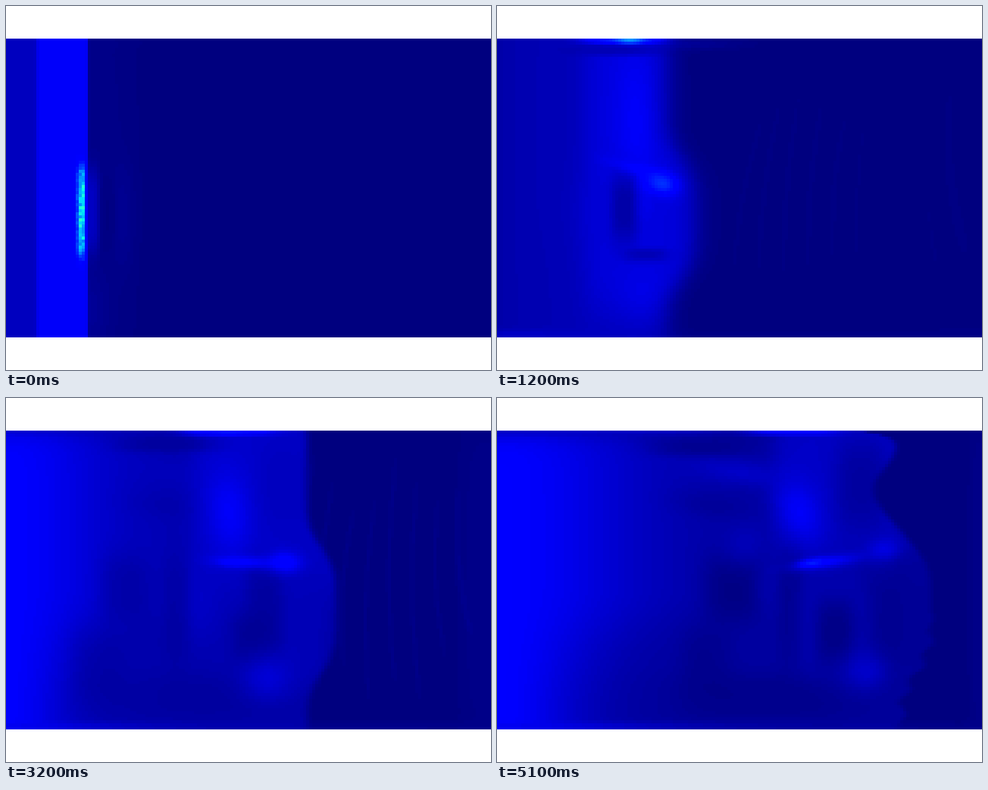
These frames come from a looping animation (640 px wide and 480 px high, 5200 ms). A matplotlib script:

```python
import numpy as np
import matplotlib.pyplot as plt
from matplotlib.animation import FuncAnimation

W, H, DPI = 640, 480, 100
TOP, BOTTOM = 43, 437
NX, NY = 160, 98
FRAMES, STEP = 52, 100

x = (np.arange(NX) + 0.5) * W / NX
y = TOP + (np.arange(NY) + 0.5) * (BOTTOM - TOP) / NY
X, Y = np.meshgrid(x, y)
rng = np.random.default_rng(4)
grain = rng.uniform(-1, 1, X.shape)

# Field levels: 0 is navy, 1 is pure blue, about 3.4 is cyan.


def ramp(v, a, b):
    s = np.clip((v - a) / (b - a), 0, 1)
    return s * s * (3 - 2 * s)


def sigmoid(d):
    return 1 / (1 + np.exp(-np.clip(d, -50, 50)))


def soft(cx, cy, rx, ry, p=2, turn=0):
    """Soft-edged patch; a higher p makes it boxier."""
    c, s = np.cos(np.radians(turn)), np.sin(np.radians(turn))
    dx, dy = X - cx, Y - cy
    u = np.abs(dx * c + dy * s) / rx
    v = np.abs(dy * c - dx * s) / ry
    return np.exp(-u ** p - v ** p)


class Layer:
    def __init__(self, field):
        self.field = field

    def mix(self, level, mask):
        self.field = self.field + (level - self.field) * mask

    def add(self, level, alpha, *shape, **kw):
        if alpha > 0.005:
            self.mix(level, alpha * soft(*shape, **kw))


def make_threads(count=10):
    """Faint curved threads that hang in the still region."""
    total = np.zeros_like(X)
    for i, x0 in enumerate(np.linspace(330, 605, count)):
        slant = -38 + 6 * i
        ya, yb = rng.uniform(80, 150), rng.uniform(300, 400)
        s = (Y - ya) / (yb - ya)
        line = x0 + slant * (s - 0.5) - 8 * np.sin(np.pi * s)
        window = sigmoid((Y - ya) / 5) * sigmoid((yb - Y) / 5)
        total = np.maximum(total, window * np.exp(-((X - line) / 4) ** 2))
    return total


threads = make_threads()


def front(t):
    """Mask of the flow: a slowing edge with a bulge, a notch and ripples."""
    late = ramp(t, 3, 4.6)
    edge = 108 + 102 * t - 3.6 * t * t
    edge = edge + 38 * ramp(t, 0, 1.4) * np.exp(-((y - 280) / 90) ** 4)
    edge -= 38 * late * np.exp(-((y - 122) / 42) ** 2)
    edge -= 60 * late * np.exp(-(y - TOP) / 7)
    edge += 5 * late * np.sin(y / 5) * ramp(y, 250, 350)
    width = 0.6 + 9 * ramp(t, 0, 0.6) - 7 * ramp(t, 1, 3.5)
    return sigmoid((edge[:, None] - X) / width)


def inlet(t):
    """Light that spreads from the left wall as the loop goes on."""
    floor = 0.54 - 0.055 * t
    reach = 45 + 28 * t
    squeeze = 1 + 2 * ramp(Y, 250, 420)
    light = 0.78 * ramp(t, 0.8, 4) * np.exp(-(X / reach) ** 2 * squeeze)
    dip = 0.32 * np.exp(-((t - 0.8) / 0.5) ** 2 - X / 60)
    rim = 0.6 * ramp(t, 1, 4.5) * np.exp(-(Y - TOP) / 10)
    return (floor + light - dip) * (1 - rim)


def column(layer, t):
    late = ramp(t, 2.4, 4.5)
    left = 41 + 64 * t
    foot = 200 + 500 * np.exp(-t / 1.3)
    width = 0.8 + 8 * ramp(t, 0, 0.6)
    band = sigmoid((X - left) / width) * sigmoid((foot - Y) / 20)
    layer.mix(0.57 + 0.43 * np.exp(-t / 1.6), 0.95 * band)
    layer.add(1.02, 0.9 * ramp(t, 0, 0.6), 118 + 55 * t, 150, 28,
              40 + 120 * np.exp(-t / 1.5), turn=-18 * late)
    # Wing on the left and shades around it
    layer.add(0.65, 0.8 * late, 65 + 50 * t, 98, 65, 17, turn=8)
    layer.add(0.15, 0.6 * late, 70 + 42 * t, 142, 48, 16, turn=8)
    layer.add(0.22, 0.85 * late, 175 + 60 * t, 115, 36, 65, p=3)
    layer.add(0.4 - 0.06 * t, 0.75 * ramp(t, 0.4, 1), 120 + 29 * t,
              56 + 1.7 * t, 65, 7 + t, p=3)


def left_side(layer, t):
    late = ramp(t, 2.4, 4.2)
    early = ramp(t, 0.2, 1) * (1 - ramp(t, 3, 4))
    layer.add(0.68, 0.65 * early, 60 + 61 * t, 272, 30, 52)
    # Dark folds
    layer.add(0.08, 0.85 * late, 130 + 45 * t, 395, 125, 33, p=3)
    layer.add(0.08, 0.75 * late, -145 + 83 * t, 355, 36, 55, p=3)
    layer.add(0.03, 0.9 * late, -110 + 83 * t, 250, 20 + 4 * t, 48, p=3)
    # Light between the folds
    layer.add(0.5, 0.8 * late, -45 + 73 * t, 192, 30, 28, turn=-35)
    layer.add(0.4, 0.7 * late, -15 + 73 * t, 248, 17, 45)
    layer.add(0.28, 0.6 * late, -70 + 80 * t, 322, 42, 22, turn=-30)
    layer.add(0.1, 0.85 * late, -50 + 86 * t, 282, 17, 75, p=3)


def right_side(layer, t):
    late = ramp(t, 2.4, 4.2)
    born = ramp(t, 0.1, 0.8)
    # Body just behind the front and its dark wake
    layer.add(0.93 - 0.145 * t, 0.8 * born, 130 + 82 * t, 285, 28,
              55 + 11 * t, p=4)
    layer.add(0.08 + 0.4 * np.exp(-t / 1.5), 0.87 * born, 65 + 86 * t,
              255 + 10 * t, 15 + 3 * t, 38 + 9 * t, p=3)
    # Arch, its hollow and the bright patch at the foot
    hollow = 120 + 64 * t
    layer.add(0.55, 0.75 * late, hollow, 300, 50, 66, p=3)
    layer.add(0.42 - 0.08 * t, 0.87 * born, hollow, 335 - 5 * t, 29,
              9 + 40 * ramp(t, 2.2, 3.8), p=3)
    layer.add(0.92 - 0.05 * t, 0.85 * born, 105 + 75 * t, 383 - 4.5 * t,
              40 - 2 * t, 40 - 2.8 * t)
    # Streak across the flow, bright at its tail late and its head early
    tilt = 22 - 6 * t
    layer.add(1.1, 0.85 * born, 115 + 63 * t, 216, 42, 8, turn=tilt)
    layer.add(1.45, 0.9 * late, 95 + 63 * t, 217, 18, 5, turn=tilt)
    layer.add(1.95 - 0.22 * t, 0.9 * born, 128 + 75 * t, 245 - 9 * t,
              22, 14, turn=tilt)


def walls(layer, t):
    born, late = ramp(t, 0.2, 0.8), ramp(t, 2.4, 4.5)
    lid = 95 + 70 * t - 2.4 * t * t
    layer.add(0.65, 0.7 * late, 150, 45, 165, 4, p=4)
    layer.add(1.45 - 0.07 * t, 0.9 * born, lid, 45, 62, 4.5, p=4)
    layer.add(3.2 - 0.5 * t, 0.9 * born * (1 - ramp(t, 2.4, 3.6)),
              lid, 45, 18, 4.5)
    layer.add(0.85, 0.8 * ramp(t, 0.4, 2), 0, 433, 70 + 35 * t, 6)
    layer.add(1.8, 0.9 * np.exp(-((t - 4.5) / 0.4) ** 2), 0, 433, 5, 5)


def hot_strip(layer, t):
    mask = soft(99.5 + 78 * t, 271 - 14 * t, 5.5 + 6 * t,
                max(59 - 27 * t, 20), p=6)
    level = 1.65 + 1.4 * np.exp(-t / 0.3) + 0.6 * grain * np.exp(-t / 0.2)
    layer.mix(level, mask * (1 - ramp(t, 0.6, 1.3)))


def still_region(t):
    layer = Layer(np.zeros_like(X))
    # Halo of the first moments
    fade, drift = 1 - ramp(t, 0, 0.7), 60 * t
    layer.add(0.1, fade, 120 + drift, 240, 55, 400)
    layer.add(0.28, 0.6 * fade, 112 + drift, 400, 20, 50)
    layer.add(0.17, 0.9 * fade, 148 + drift, 275, 20, 70, p=3)
    layer.add(0.02, 0.9 * fade, 134 + drift, 275, 12, 62, p=3)
    layer.add(0.6, 0.9 * fade, 110 + drift, 270, 13, 58, p=4)
    # Faint glows later on
    layer.add(0.07, np.exp(-((t - 0.85) / 0.35) ** 4), 390, 235, 115, 130, p=4)
    layer.add(0.25, 0.8 * np.exp(-((t - 1) / 0.6) ** 2), 150 + 88 * t, 50, 70, 8)
    layer.add(0.09, ramp(t, 0.9, 1.6), 640, 240, 90 - 14 * t, 260, p=4)
    layer.add(0.14, 0.9 * ramp(t, 0.8, 1.6), 400, 436, 400, 9)
    shown = ramp(t, 0.8, 2) * (1 - 0.85 * ramp(t, 3, 4.5))
    return layer.field + 0.08 * shown * threads


def field_at(t):
    flow = Layer(inlet(t))
    for part in (column, left_side, right_side, walls, hot_strip):
        part(flow, t)
    still = Layer(still_region(t))
    still.mix(flow.field, front(t))
    return still.field


fig = plt.figure(figsize=(W / DPI, H / DPI), dpi=DPI, facecolor="white")
ax = fig.add_axes([0, 0, 1, 1])
image = ax.imshow(field_at(0), cmap="jet", vmin=0, vmax=1 / 0.11,
                  extent=[0, W, BOTTOM, TOP], interpolation="nearest",
                  aspect="auto")
ax.set(xlim=(0, W), ylim=(H, 0))
ax.axis("off")


def update(i):
    image.set_data(field_at(i * STEP / 1000))
    return [image]


anim = FuncAnimation(fig, update, frames=FRAMES, interval=STEP, repeat=True,
                     repeat_delay=0)
plt.show()
```
